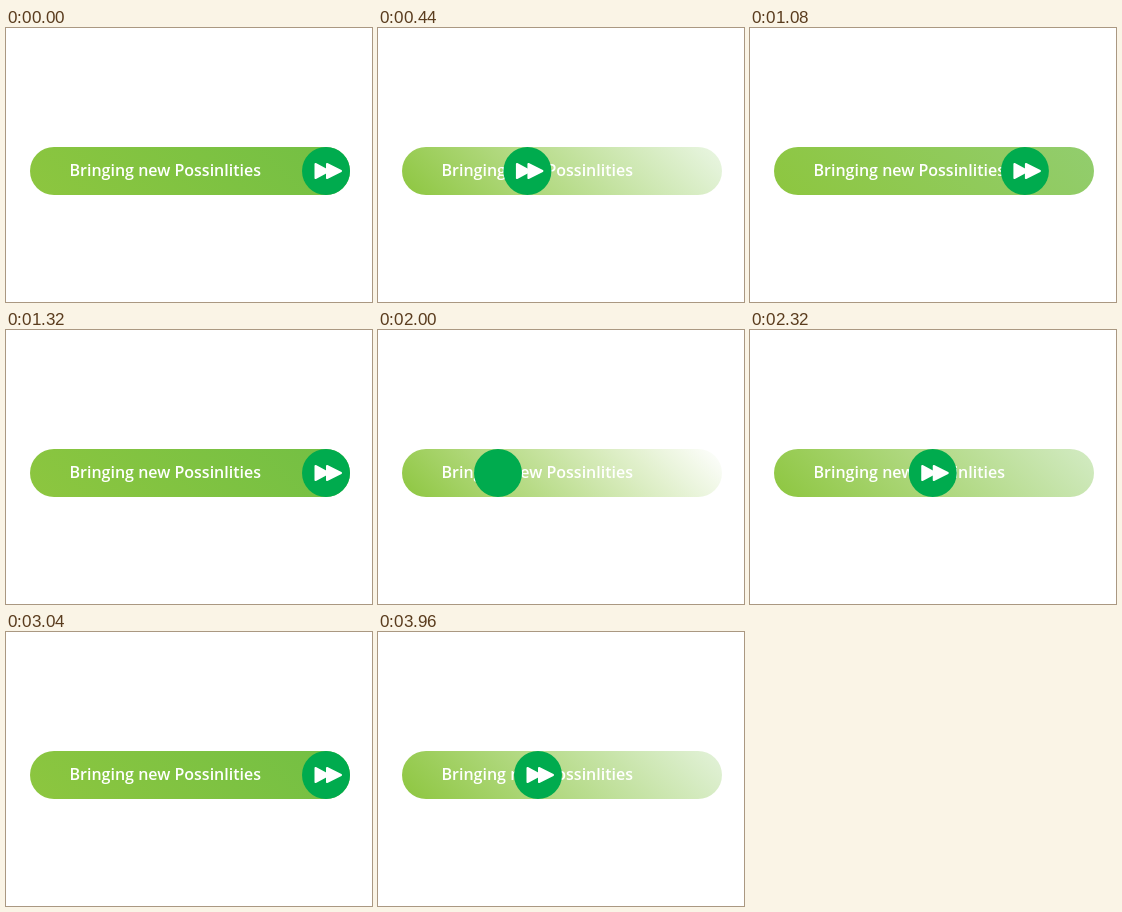
An HTML page that plays this animation: 366x274 px, repeating every 4 s.

```html
<!DOCTYPE html>
<html lang="en">
<head>
<meta charset="utf-8">
<title>Sliding button</title>
<style>
  html, body { margin: 0; width: 100%; height: 100%; overflow: hidden; background: #fff; }
  svg { display: block; width: 366px; height: 274px; }
  text { font: 600 16px "Open Sans", "Noto Sans", sans-serif; fill: #fff; }
  .arrow { fill: #fff; stroke: #fff; stroke-width: 2; stroke-linejoin: round; }
</style>
</head>
<body>
<svg viewBox="0 0 366 274">
  <defs>
    <!-- 45 degree gradient across the 320 x 48 bar -->
    <linearGradient id="fill" gradientUnits="userSpaceOnUse" x1="92" y1="235" x2="276" y2="51">
      <stop offset="0" stop-color="#8dc63f"/>
      <stop id="end" offset="1" stop-color="#72bf44"/>
    </linearGradient>
  </defs>
  <rect x="24" y="119" width="320" height="48" rx="24" fill="url(#fill)"/>
  <text x="63.5" y="148">Bringing new Possinlities</text>
  <g id="knob" transform="translate(320 143)">
    <circle r="24" fill="#00ab4e"/>
    <g id="arrow" class="arrow">
      <path d="M-10.5 -7 L2.5 0 L-10.5 7 Z"/>
      <path d="M1 -7 L15 0 L1 7 Z"/>
    </g>
  </g>
</svg>
<script>
  const LOOP = 4000, STEP = 40, SLIDE = 1020;
  const FROM = 120, TO = 320;
  const END = [114, 191, 68];
  // when each slide becomes visible, and when its motion begins
  const slides = [
    { show: 320, start: 290 },
    { show: 2000, start: 2000 },
    { show: 3800, start: 3756 }
  ];
  const byId = id => document.getElementById(id);
  const knob = byId('knob'), arrow = byId('arrow'), end = byId('end');

  function progress(t) {
    const slide = slides.filter(s => t >= s.show).pop();
    return slide ? Math.min(1, (t - slide.start) / SLIDE) : 1;
  }

  function draw(now) {
    const t = Math.floor(now % LOOP / STEP) * STEP;
    const p = progress(t);
    const color = END.map(c => Math.round(255 + (c - 255) * p));
    knob.setAttribute('transform', `translate(${FROM + (TO - FROM) * p} 143)`);
    arrow.setAttribute('visibility', p > 0 ? 'visible' : 'hidden');
    end.setAttribute('stop-color', `rgb(${color})`);
  }

  const origin = performance.now();
  function tick() {
    draw(performance.now() - origin);
    requestAnimationFrame(tick);
  }
  tick();
</script>
</body>
</html>
```
